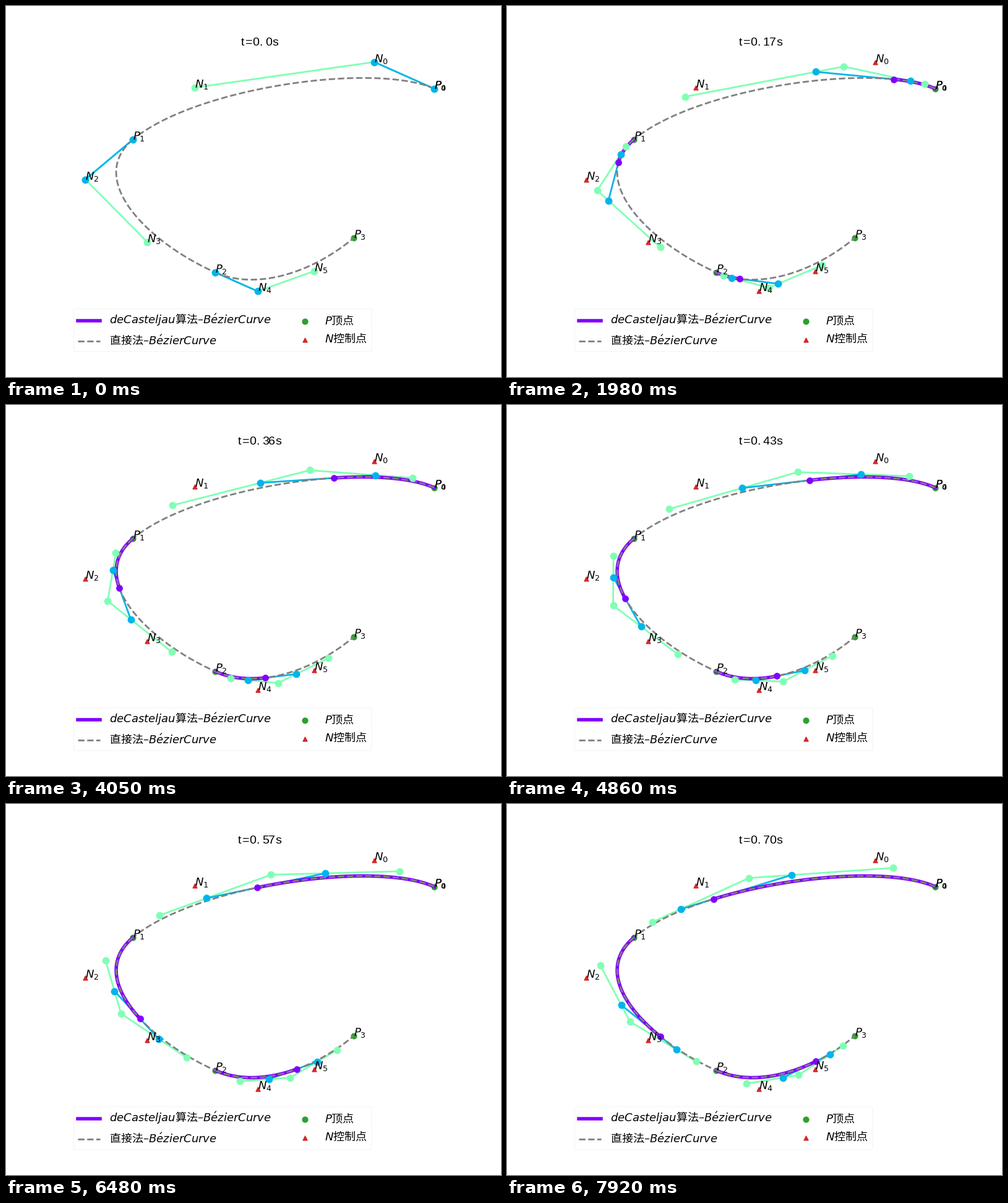
Animation, 800 px wide and 600 px high, one loop 8000 ms. Source, as a matplotlib script:

```python
import numpy as np
import matplotlib.pyplot as plt
from matplotlib.animation import FuncAnimation
from matplotlib.patches import FancyBboxPatch

plt.rcParams["font.family"] = "Noto Sans CJK JP"
plt.rcParams["mathtext.fontset"] = "dejavusans"

W, H = 800, 600
FRAMES, LOOP = 89, 8000
STEPS = 125            # steps for the parameter to go from 0 to 1
ASPECT = 1.70          # vertical units count more in edge lengths
PURPLE, BLUE, MINT = "#8000ff", "#00b5eb", "#80ffb4"
GREEN, RED, GRAY = "tab:green", "tab:red", "gray"

P = np.array([(691.8, 133.6), (205.1, 216), (338.2, 430.8), (562, 375.1)])


def smooth_controls(points):
    """Return the (before, after) control points at each closed-polygon vertex."""
    prev, nxt = np.roll(points, 1, axis=0), np.roll(points, -1, axis=0)
    before = np.linalg.norm((points - prev) * [1, ASPECT], axis=1)
    after = np.linalg.norm((nxt - points) * [1, ASPECT], axis=1)
    share = (before / (before + after))[:, None]
    half = (nxt - prev) / 2
    return points - share * half, points + (1 - share) * half


def casteljau(points, t):
    """Return the point sets of every level below the control polygon."""
    levels = []
    while len(points) > 1:
        points = (1 - t) * points[:-1] + t * points[1:]
        levels.append(points)
    return levels


def bezier(points, t):
    t = np.asarray(t)[:, None]
    a, b, c, d = points
    s = 1 - t
    return s**3 * a + 3 * s**2 * t * b + 3 * s * t**2 * c + t**3 * d


ahead, behind = smooth_controls(P)
SEGMENTS = [np.array([P[i], behind[i], ahead[i + 1], P[i + 1]])
            for i in range(3)]
N = np.concatenate([seg[1:3] for seg in SEGMENTS])

fig = plt.figure(figsize=(W / 100, H / 100), dpi=100, facecolor="white")
ax = fig.add_axes([0, 0, 1, 1])
ax.set_xlim(0, W)
ax.set_ylim(H, 0)
ax.axis("off")


def vertices(points):
    ax.scatter(*np.transpose(points), s=40, color=GREEN, zorder=1)


def controls(points):
    ax.scatter(*np.transpose(points), s=25, color=RED, marker="^", zorder=1)


def label(x, y, text):
    ax.text(x, y, text, size=13, va="baseline", zorder=9)


def line(color, width, z):
    return ax.plot([], [], color=color, lw=width, zorder=z)[0]


def dots(color, size, z):
    return ax.plot([], [], "o", color=color, ms=size, mew=0, zorder=z)[0]


# fixed points, their names and the directly computed curve
vertices(P)
controls(N)
for i, (x, y) in enumerate([*P, P[0]]):
    label(x, y, f"$P_{i}$")
for i, (x, y) in enumerate(N):
    label(x, y, f"$N_{i}$")
for seg in SEGMENTS:
    ax.plot(*bezier(seg, np.linspace(0, 1, STEPS + 1)).T, "--",
            color=GRAY, lw=2, zorder=5)

# legend
ax.add_patch(FancyBboxPatch((112.5, 492.5), 475.5, 63.5,
                            boxstyle="round,pad=3,rounding_size=3",
                            fc="white", ec="#f6f6f6", lw=1, zorder=0))
ax.plot([115.8, 151.9], [509, 509], color=PURPLE, lw=4)
ax.plot([115.8, 151.9], [542.3, 542.3], "--", color=GRAY, lw=2)
vertices([(483.4, 510)])
controls([(483.4, 540.3)])
label(167.3, 514, r"$deCasteljau$算法–$B\acute{e}zierCurve$")
label(167.3, 548, r"直接法–$B\acute{e}zierCurve$")
label(514.8, 515, "$P$顶点")
label(514.8, 544, "$N$控制点")

# moving parts, one set for each segment: lines below the curve, dots above
parts = []
for _ in SEGMENTS:
    parts.append({
        "mint": (line(MINT, 2, 2), dots(MINT, 8.5, 6)),
        "blue": (line(BLUE, 2, 3), dots(BLUE, 8.5, 7)),
        "trail": line(PURPLE, 4, 4),
        "tip": dots(PURPLE, 7.8, 8),
    })

PITCH = 10.42          # half-width cell of the title
title = [ax.text(0, 64, "", size=14, ha="center", va="baseline",
                 family="Liberation Sans", zorder=9) for _ in range(7)]


def set_title(text):
    left = 408.8 - PITCH * len(text) / 2
    for i, cell in enumerate(title):
        char = text[i:i + 1]
        shift = -2 if char == "." else 0
        cell.set_text(char)
        cell.set_x(left + PITCH * (i + 0.5) + shift)


def update(k):
    t = k / STEPS
    set_title(f"t={str(t)[:4]}s")
    for seg, part in zip(SEGMENTS, parts):
        first, second, last = casteljau(seg, t)
        for artist in part["mint"]:
            artist.set_data(*first.T)
        for artist in part["blue"]:
            artist.set_data(*second.T)
        part["trail"].set_data(*bezier(seg, np.arange(k + 1) / STEPS).T)
        part["tip"].set_data(*last.T)
        part["trail"].set_visible(k > 0)
        part["tip"].set_visible(k > 0)
    return []


anim = FuncAnimation(fig, update, frames=FRAMES, interval=LOOP / FRAMES,
                     repeat=True, repeat_delay=0, blit=False)
plt.show()
```
